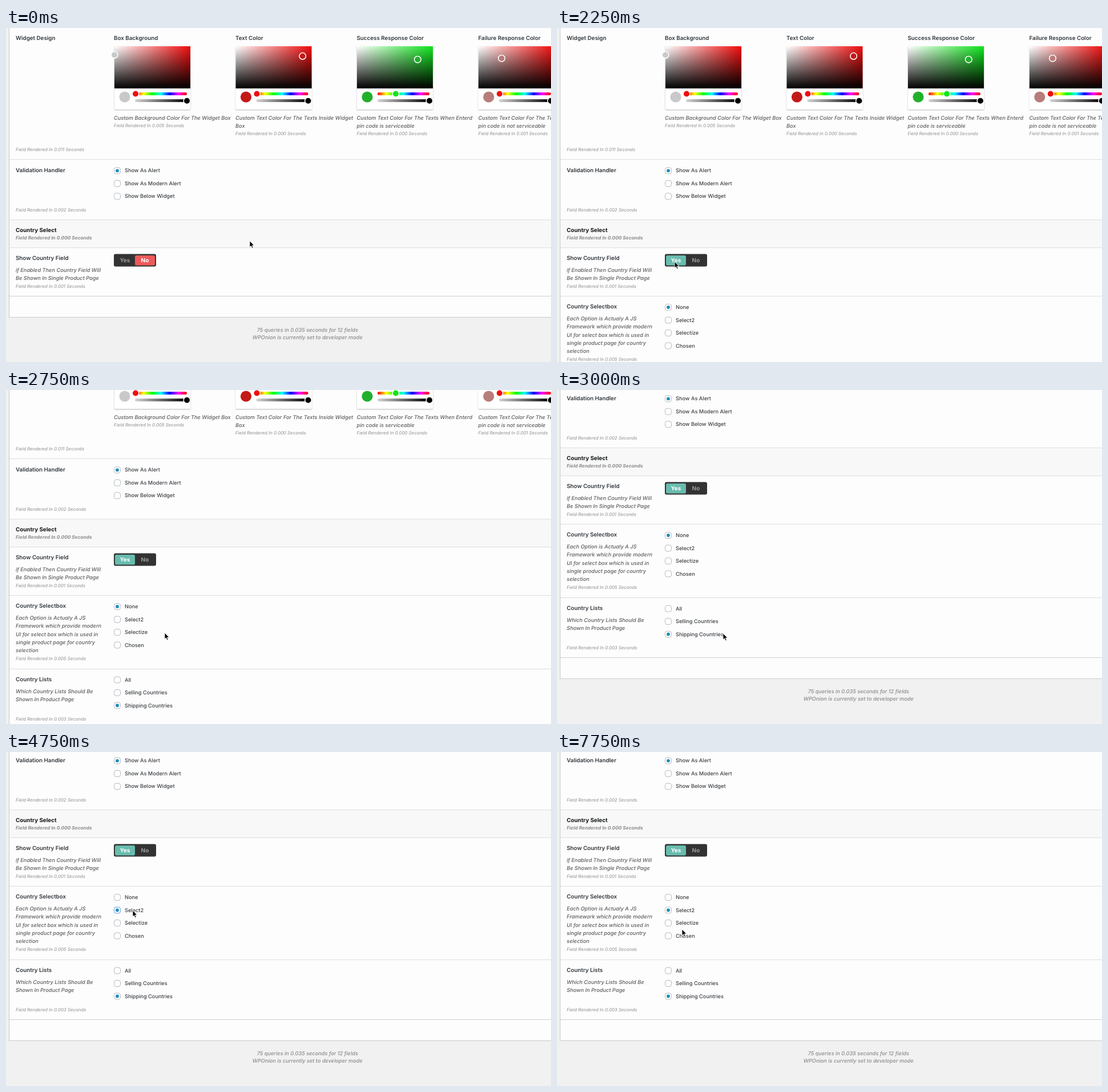
Write an HTML page that moves like this. It is 955 by 586 pixels and loops after 8000 ms.

```html
<!DOCTYPE html>
<html lang="en">
<head>
<meta charset="utf-8">
<title>Widget settings</title>
<style>
  html, body { margin: 0; height: 100%; overflow: hidden; background: #f1f1f1; }
  svg { display: block; width: 955px; height: 586px; }
  text { font: 500 9.2px Inter, sans-serif; fill: #3c4045; text-rendering: geometricPrecision; white-space: pre; }
  .title { font-size: 9.8px; font-weight: 600; fill: #32373c; }
  .head { font-size: 9.8px; font-weight: 700; fill: #15181b; }
  .desc { font-style: italic; fill: #5c5c5c; }
  .hint { font-size: 7.9px; font-weight: 400; font-style: italic; fill: #8c8c8c; }
  .strong { font-size: 8.3px; font-weight: 700; }
  .foot { font-style: italic; fill: #8a8a8a; text-anchor: middle; }
  .switch { font-size: 10px; font-weight: 700; text-anchor: middle; }
  .pop { font: 10.25px "Liberation Sans", Arial, sans-serif; fill: #666; }
</style>
</head>
<body>
<svg id="stage" viewBox="0 0 955 586" xmlns="http://www.w3.org/2000/svg"></svg>
<script>
const LOOP = 8000, OPEN_SHIFT = 234;

// text centred vertically on y
const text = (x, y, s, cls = '', size = 9.2, fill = '') =>
  `<text x="${x}" y="${(y + size * 0.36).toFixed(2)}" class="${cls}"${fill && ` style="fill:${fill}"`}>${s}</text>`;
const rect = (x, y, w, h, fill, more = '') =>
  `<rect x="${x}" y="${y}" width="${w}" height="${h}" fill="${fill}" ${more}/>`;
const disc = (x, y, r, fill, more = '') => `<circle cx="${x}" cy="${y}" r="${r}" fill="${fill}" ${more}/>`;
const rule = (y, color = '#dedede') => rect(6, y, 960, 1, color);
const title = (x, y, s) => text(x, y, s, 'title', 9.8);
const desc = (x, y, ...lines) => lines.map((s, i) => text(x, y + i * 14.25, s, 'desc')).join('');
const hint = (x, y, sec) => text(x, y, `Field Rendered In ${sec} Seconds`, 'hint', 7.9);
const group = (id, body) => `<g id="${id}">${body}</g>`;

function radios(y, labels, picked, name) {
  return labels.map((label, i) => {
    const cy = y + i * 22.5;
    return rect(189.5, cy - 5.5, 11, 11, '#fff', `rx="3.6" stroke="#b4b9be" id="${name}Box${i}"`) +
      disc(195, cy, 2.9, '#1e8cbe', `id="${name}Dot${i}" opacity="${+(i === picked)}"`) +
      text(208, cy - 0.3, label);
  }).join('');
}

function gradient(id, stops, vertical) {
  const list = stops.map((c, i) =>
    `<stop offset="${i / (stops.length - 1)}" stop-color="${c[0]}" stop-opacity="${c[1] ?? 1}"/>`).join('');
  return `<linearGradient id="${id}" x2="${vertical ? 0 : 1}" y2="${vertical ? 1 : 0}">${list}</linearGradient>`;
}

// x: left edge, hue: pure colour, color: chosen colour, px/py: ring, knob: hue knob offset
function picker(x, hue, color, px, py, knob) {
  const id = 'sat' + Math.round(x);
  const ring = 'stroke="#fff" stroke-width="1.5"';
  return gradient(id, [['#fff'], [hue]]) +
    rect(x, 32, 133, 111, '#fff', 'filter="url(#card)"') +
    rect(x, 32, 133, 74, `url(#${id})`) + rect(x, 32, 133, 74, 'url(#dark)') +
    disc(px, py, 5.8, color, ring) +
    disc(x + 18, 121, 9.6, color) +
    rect(x + 36, 113, 91, 5, 'url(#rainbow)', 'rx="2.5"') +
    disc(x + knob, 115.5, 5.8, hue, ring) +
    rect(x + 36, 125, 91, 5, 'url(#checks)', 'rx="2.5"') +
    rect(x + 36, 125, 91, 5, 'url(#alpha)', 'rx="2.5"') +
    disc(x + 127, 127.7, 5.8, '#000', ring);
}

const toggle = (id, x, color, yes, no) => group(id,
  rect(x, 399, 35, 17.5, color, 'rx="2.5"') +
  text(208.5, 407.3, 'Yes', 'switch', 10, yes) + text(243.5, 407.3, 'No', 'switch', 10, no));

const defs = `<defs>
  ${gradient('dark', [['#000', 0], ['#000']], true)}
  ${gradient('alpha', [['#000', 0], ['#000']])}
  ${gradient('rainbow', ['#f00', '#ff0', '#0f0', '#0ff', '#00f', '#f0f', '#f00'].map(c => [c]))}
  <pattern id="checks" width="3" height="3" patternUnits="userSpaceOnUse">
    ${rect(0, 0, 3, 3, '#fff')}${rect(0, 0, 1.5, 1.5, '#aaa')}${rect(1.5, 1.5, 1.5, 1.5, '#aaa')}
  </pattern>
  <filter id="card" x="-10%" y="-10%" width="120%" height="125%">
    <feDropShadow dx="0" dy="1" stdDeviation="1.3" flood-opacity=".28"/>
  </filter>
  <filter id="lift" x="-30%" y="-30%" width="160%" height="160%">
    <feDropShadow dx="0" dy="3" stdDeviation="13" flood-color="#21384d" flood-opacity=".3"/>
  </filter>
  <filter id="glow"><feDropShadow dx="0" dy="0" stdDeviation="1.6" flood-color="#66afe9" flood-opacity=".8"/></filter>
</defs>`;

const colors =
  title(17, 17.2, 'Widget Design') + hint(17, 212.7, '0.011') +
  title(189, 17.2, 'Box Background') + picker(190, '#f00d0d', '#c9c9c9', 190, 47.3, 37) +
  desc(189, 157.8, 'Custom Background Color For The Widget Box') + hint(189, 170.7, '0.005') +
  title(402, 17.2, 'Text Color') + picker(402.5, '#f00d0d', '#c31a18', 519.7, 49.3, 37) +
  desc(402, 157.8, 'Custom Text Color For The Texts Inside Widget', 'Box') + hint(402, 185, '0.000') +
  title(614.5, 17.2, 'Success Response Color') + picker(615, '#10e41c', '#22b02c', 721.3, 55.2, 68) +
  desc(614.5, 157.8, 'Custom Text Color For The Texts When Enterd', 'pin code is serviceable') + hint(614.5, 185, '0.000') +
  title(827.5, 17.2, 'Failure Response Color') + picker(827.8, '#f00d0d', '#b87d7b', 868.5, 53.2, 37) +
  desc(827.5, 157.8, 'Custom Text Color For The Texts When Enterd', 'pin code is not serviceable') + hint(827.5, 185, '0.001');

const fields =
  rule(230) + title(17, 249, 'Validation Handler') + hint(17, 318.7, '0.002') +
  radios(250.3, ['Show As Alert', 'Show As Modern Alert', 'Show Below Widget'], 0, 'alert') +
  rect(6, 336, 960, 50, '#f8f8f8') + rule(336) + rule(385) +
  text(17, 354.8, 'Country Select', 'head', 9.8) +
  text(17, 367.7, 'Field Rendered In 0.000 Seconds', 'hint strong', 8.3) +
  title(17, 403.5, 'Show Country Field') +
  desc(17, 424.8, 'if Enabled Then Country Field Will', 'Be Shown In Single Product Page') + hint(17, 452.9, '0.001') +
  rect(189, 396.5, 74, 22, '#333', 'rx="3"') +
  toggle('off', 226, '#ee5a5b', '#999', '#fff') + toggle('on', 191, '#68bcae', '#fff', '#999');

const extra = group('extra',
  rule(470) + title(17, 488.5, 'Country Selectbox') +
  desc(17, 509.7, 'Each Option is Actualy A JS', 'Framework which provide modern', 'UI for select box which is used in',
    'single product page for country', 'selection') + hint(17, 581.2, '0.005') +
  radios(490, ['None', 'Select2', 'Selectize', 'Chosen'], 0, 'box') +
  rule(599) + title(17, 617.3, 'Country Lists') +
  desc(17, 638.2, 'Which Country Lists Should Be', 'Shown In Product Page') + hint(17, 687.2, '0.003') +
  radios(618.5, ['All', 'Selling Countries', 'Shipping Countries'], 2, 'list'));

const footer = group('footer',
  rule(470, '#cfcfcf') + rect(0, 508, 960, 400, '#f1f1f1') + rect(5, 507, 960, 1, '#cacaca') +
  text(528.3, 529.2, '75 queries in 0.035 seconds for 12 fields', 'foot') +
  text(528.3, 542.4, 'WPOnion is currently set to developer mode', 'foot'));

const popup = group('popup',
  '<path d="M251 264H463Q465 264 465 266V416Q465 418 463 418H251Q249 418 249 416V283L243 277L249 271V266Q249 264 251 264Z" fill="#fff" filter="url(#lift)"/>' +
  rect(260.5, 271.5, 189, 24, '#fff', 'rx="2" stroke="#66afe9" filter="url(#glow)"') +
  text(266, 284.2, 'Choose a Country', 'pop', 10.25, '#8a8a8a') +
  '<path d="M437 286.5H443L440 282ZM437.8 332H442.2L440 328.5Z" fill="#777"/>' +
  rect(260, 296, 1, 116, '#c4c4c4') + rect(449, 296, 1.5, 116, '#c4c4c4') +
  rect(263.5, 299.5, 183, 21, '#fff', 'stroke="#4f7fb8"') +
  '<path d="M438.6 308.8L441.8 312.2" stroke="#555" stroke-width="1.8"/>' +
  disc(436.4, 306.6, 2.9, 'none', 'stroke="#666" stroke-width="1.2"') +
  rect(263, 323.5, 171, 22, '#428bca') +
  ['United States', 'United Kingdom', 'Afghanistan', 'Albania'].map((s, i) =>
    text(268, 334.5 + i * 21.7, s, 'pop', 10.25, i ? '' : '#fff')).join('') +
  rect(435, 323.5, 11, 88.5, '#f1f1f1') + rect(436, 336, 9, 12.5, '#c1c1c1'));

const cursor = '<path id="cursor" d="M0 0V11L2.5 8.7L4.2 12.7L6.1 11.9L4.4 8H7.8Z" fill="#000" stroke="#fff" stroke-width=".8"/>';

const $ = id => document.getElementById(id);
$('stage').innerHTML = defs + group('page',
  rect(5, -10, 960, 900, '#c9c9c9') + rect(6, -10, 960, 900, '#fdfdfd') +
  colors + fields + extra + footer) + popup + cursor;

// [start ms, value...]
const pointer = [[0, 427, 373.5], [250, 427, 374], [500, 245, 414.5], [750, 197.5, 451.5], [1000, 200, 422],
  [1250, 207, 413.5], [1750, 206, 410], [2500, 265, 425.5], [2750, 278, 426], [3000, 291, 427], [3500, 255, 322],
  [3750, 197, 280], [4000, 222, 278], [5250, 221, 303.5], [5500, 219.5, 300.5], [6250, 199, 300.5],
  [6500, 190.5, 300.5], [7250, 221, 298.5], [7750, 219, 311]];
const scroll = [[0, 0], [2750, 110], [3000, 235]];
const fade = [[0, 0], [3750, 0.5], [4000, 1], [4500, 0.4], [4750, 0]];
const at = (keys, t) => keys.findLast(k => k[0] <= t);
const show = (id, on) => $(id).setAttribute('opacity', +on);

function draw(now) {
  const t = now % LOOP, open = t >= 2250, picked = t >= 4500;
  const [, x, y] = at(pointer, t);
  $('page').setAttribute('transform', `translate(0 ${-at(scroll, t)[1]})`);
  $('footer').setAttribute('transform', `translate(0 ${open ? OPEN_SHIFT : 0})`);
  $('cursor').setAttribute('transform', `translate(${x} ${y})`);
  show('extra', open);
  show('on', open);
  show('off', !open);
  show('boxDot0', !picked);
  show('boxDot1', picked);
  $('boxBox1').setAttribute('stroke', picked && t < 5250 ? '#5b9dd9' : '#b4b9be');
  show('popup', at(fade, t)[1]);
  requestAnimationFrame(draw);
}
requestAnimationFrame(draw);
</script>
</body>
</html>
```
